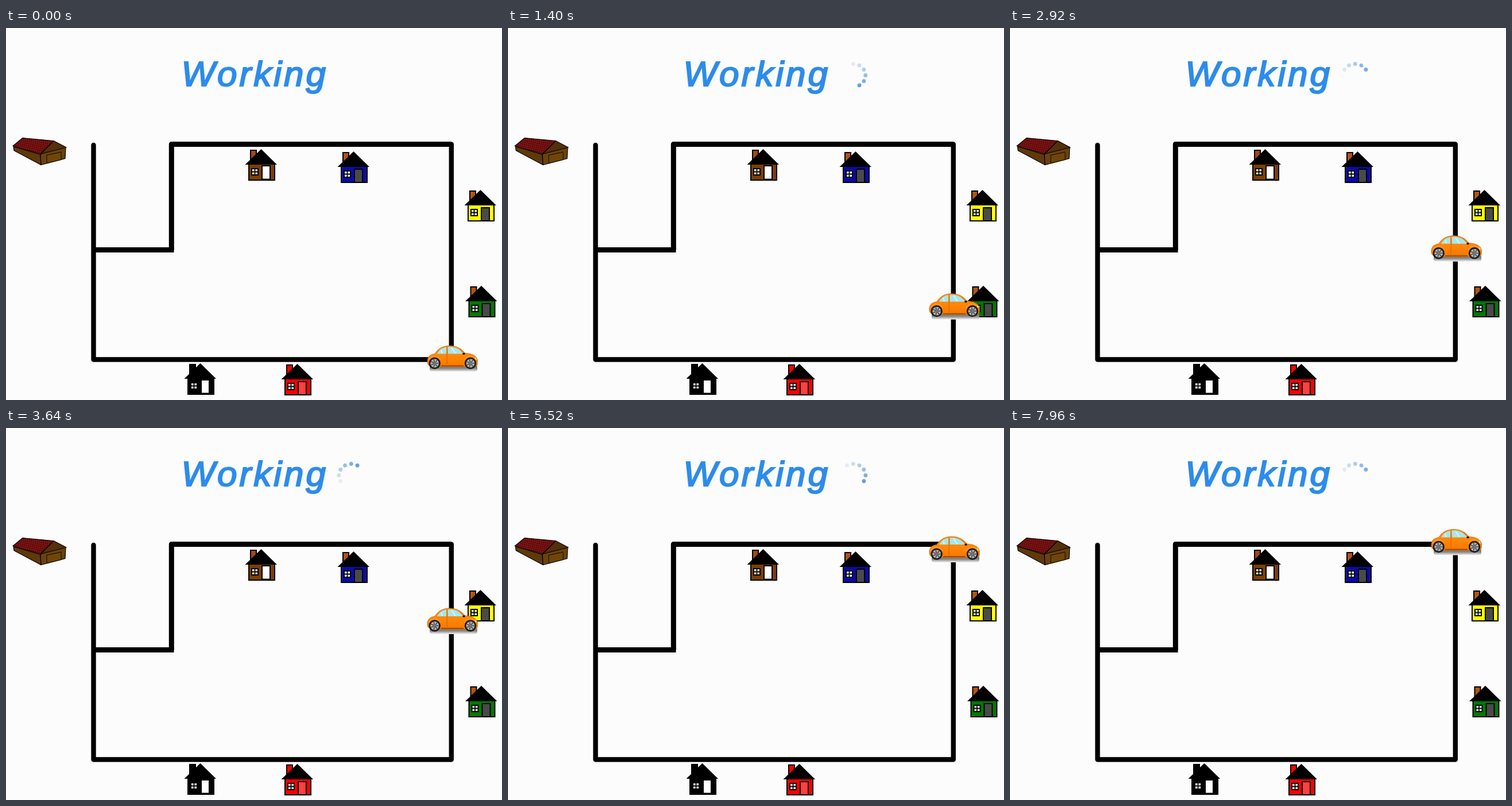
An HTML page that plays this animation: 864 by 648 pixels, repeating every 8 s.

```html
<!DOCTYPE html>
<html lang="en">
<head>
<meta charset="utf-8">
<title>Working</title>
<style>
  html, body { margin: 0; width: 100%; height: 100%; overflow: hidden; background: #fcfcfc; }
  svg { display: block; width: 100%; height: 100%; }
  .title {
    font: italic 62px "Liberation Sans", Arial, sans-serif;
    letter-spacing: 4px; fill: #2d8ceb; stroke: #2d8ceb; stroke-width: 2.2px;
  }
</style>
</head>
<body>
<svg viewBox="0 0 864 648">
  <defs>
    <pattern id="tiles" width="3.500" height="3.500" patternUnits="userSpaceOnUse" patternTransform="rotate(12)">
      <rect width="3.500" height="3.500" fill="#941616"/>
      <path d="M0 .5H3.500M.5 0V3.500" stroke="#4a0a0a" stroke-width="1"/>
    </pattern>
    <linearGradient id="shade" x2="0" y2="1">
      <stop offset="0" stop-color="#666"/>
      <stop offset=".55" stop-color="#8c8c8c"/>
      <stop offset="1" stop-color="#f0f0f0"/>
    </linearGradient>
    <linearGradient id="paint" x2="0" y2="1">
      <stop offset="0" stop-color="#ff9210"/>
      <stop offset=".55" stop-color="#ff8508"/>
      <stop offset="1" stop-color="#f57800"/>
    </linearGradient>
    <g id="wheel">
      <circle r="10.200" fill="#1c1c1c"/>
      <circle r="7.400" fill="#b4b4b4"/>
      <path id="spokes" stroke="#4a4a4a" stroke-width="1.700"/>
      <circle r="2.200" fill="#777"/>
    </g>
  </defs>

  <rect width="864" height="648" fill="#fcfcfc"/>
  <text class="title" x="305.500" y="101">Working</text>
  <g id="spinner" fill="#659cde"></g>

  <g fill="none" stroke="#000" stroke-linejoin="round">
    <path d="M152.500 204V577.500H775.800V202.500" stroke-width="8.400" stroke-linecap="round"/>
    <path d="M775.500 202.500H288.300V386.500" stroke-width="9"/>
    <path d="M153 386.500H292.500" stroke-width="9.200"/>
  </g>

  <g transform="translate(0 -.5)" stroke="#000" stroke-width="1.200" stroke-linejoin="round">
    <path d="M13 207L60 221L61 239L14 214Z" fill="#5f3a06"/>
    <path d="M60 221L83 198L104 209L103 228L61 239Z" fill="#6b4208"/>
    <path d="M60 220L83 197L105 208.500Z" fill="#55300a"/>
    <path d="M71 236V222L96 216.500V230Z" fill="#6f4508" stroke-width=".9"/>
    <path d="M12 206L29 192L83 197L60 220Z" fill="url(#tiles)"/>
  </g>

  <g id="houses" stroke="#000" stroke-width="2"></g>

  <g id="car">
    <rect x="4" y="34" width="83" height="11.500" rx="4" fill="url(#shade)"/>
    <path d="M0 28C0 21 3 16 13 14.500C19 4.500 28 .5 39 .5C52 .5 59 6 66 13.500C78 14 86 18 87.500 26L87 34C86 36 84 37 80 37H8C3 36 0 34 0 28Z"
          fill="url(#paint)" stroke="#c85c05" stroke-width=".7"/>
    <path d="M17 14.500C21 7.500 26 4 33 3V14.500Z" fill="#a5e6f0"/>
    <path d="M35.500 2.800C48 1.500 56 6 62.500 14.500H36Z" fill="#a5e6f0"/>
    <path d="M42 3.500L49 14M24 8L26 14" stroke="#d6f6f8" stroke-width="2"/>
    <path d="M34.200 2V33M56 5.500L64 14.500" stroke="#c85c05" stroke-width=".8" fill="none"/>
    <path d="M24 35.500H63" stroke="#a34c06" stroke-width="2"/>
    <path d="M2 26C4 18 18 16 23 25M64 26C67 17 80 16 85 25" stroke="#ffad48" stroke-width="1" fill="none"/>
    <ellipse cx="63.500" cy="14.500" rx="2.300" ry="1.800" fill="#111"/>
    <path d="M83 20L86.500 25L83 24Z" fill="#ffe3b0"/>
    <use href="#wheel" x="12.700" y="31"/>
    <use href="#wheel" x="75" y="31"/>
  </g>
</svg>
<script>
const LOOP = 8000, TICK = 40;
const $ = id => document.getElementById(id);
const rad = deg => deg * Math.PI / 180;

// apex x, apex y, wall, chimney, door, taller door
const houses = [
  [444.5, 211.5, '#7b3f00', '#a34a0c', '#fff', true],
  [605.5, 215.5, '#0a0aaa', '#b5530f', '#4a4a4a'],
  [826.5, 282.5, '#ff0', '#b5530f', '#4a4a4a'],
  [828, 449.5, '#007a00', '#b5530f', '#4a4a4a'],
  [338.5, 584.5, '#000', '#000', '#fff', true],
  [507.5, 585.5, '#f00', '#f00', '#ff4040']
];

const house = ([x, y, wall, chimney, door, tall]) => `
  <g transform="translate(${x} ${y})">
    <rect x="-18.500" y="1.500" width="10" height="22" fill="${chimney}"/>
    <rect x="-21.500" y="24.500" width="45" height="29" fill="${wall}"/>
    <path d="M-28 26.500L0 -.5L27.500 26.500Z" stroke="none"/>
    <rect x="-16.500" y="33.500" width="11" height="11" fill="#fff"/>
    <path d="M-11 33.500V44.500M-16.500 39H-5.500" stroke-width="1.800"/>
    <rect x="1.500" y="${tall ? 28.5 : 30.5}" width="14" height="${tall ? 23.5 : 23}" fill="${door}"/>
  </g>`;

$('houses').innerHTML = houses.map(house).join('');

$('spokes').setAttribute('d', Array.from({ length: 7 }, (_, i) => {
  const a = rad(i * 360 / 7);
  return `M0 0L${7 * Math.cos(a)} ${7 * Math.sin(a)}`;
}).join(''));

// Twelve dots clockwise, the first one on the left
const DOTS = 12, STEP = 69.8, START = 4, FADE = 6;
$('spinner').innerHTML = Array.from({ length: DOTS }, (_, i) => {
  const a = rad(180 + i * 30);
  return `<circle cx="${601.3 + 21.5 * Math.cos(a)}" cy="${82.5 + 20 * Math.sin(a)}" r="3.400"/>`;
}).join('');
const dots = [...$('spinner').children];

function draw(t) {
  const y = Math.max(176, 553 - 0.0664 * Math.max(0, t - 32));
  $('car').setAttribute('transform', `translate(734 ${y.toFixed(2)})`);

  const phase = (t - START) / STEP;
  dots.forEach((dot, i) => {
    const age = phase < i ? FADE : (phase - i) % DOTS;
    dot.setAttribute('opacity', Math.max(0, 1 - age / FADE).toFixed(3));
  });
}

const origin = performance.now();
function frame() {
  const t = (performance.now() - origin) % LOOP;
  draw(Math.floor(t / TICK) * TICK);
  requestAnimationFrame(frame);
}
draw(0);
requestAnimationFrame(frame);
</script>
</body>
</html>
```
